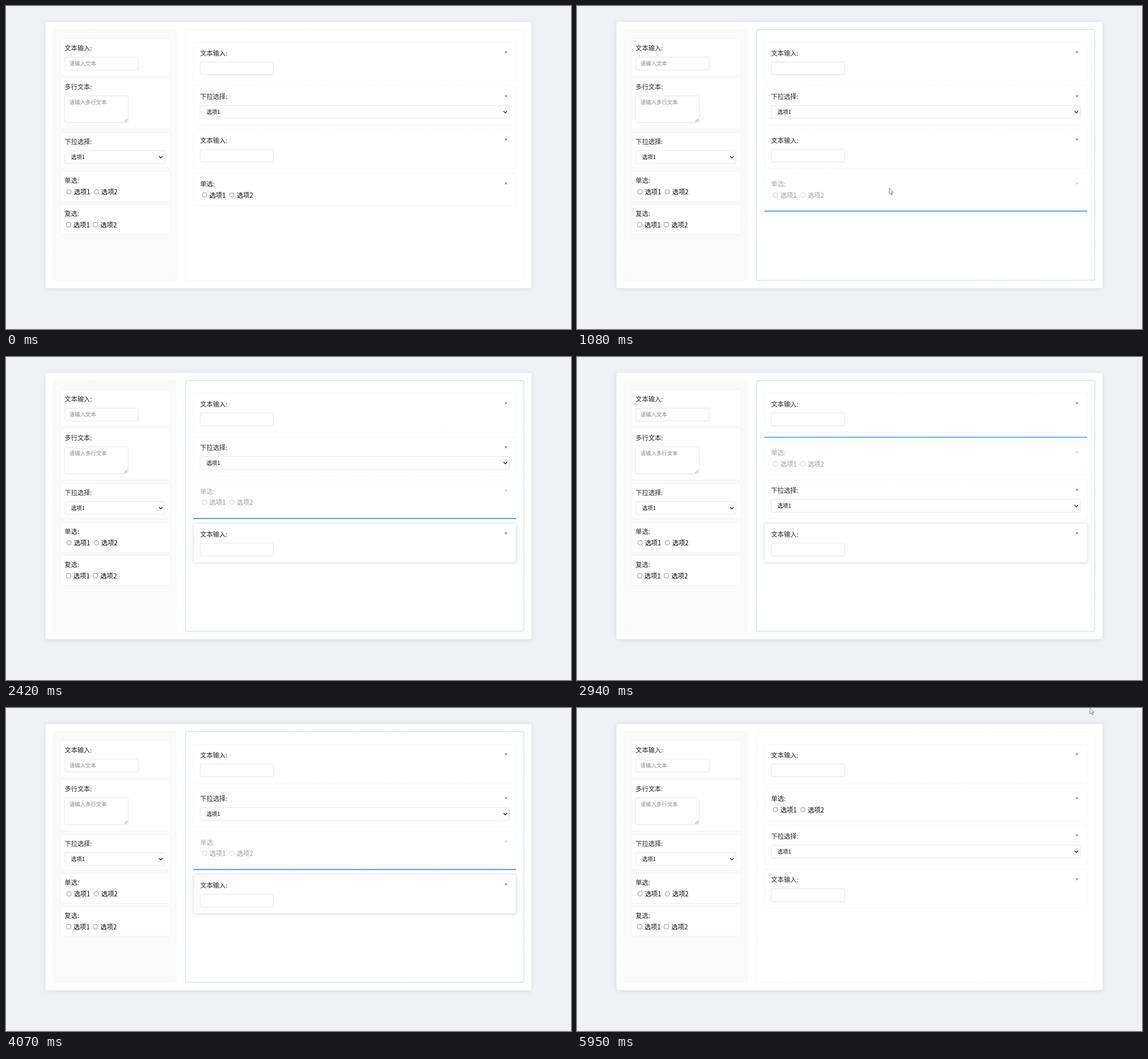
An HTML page that plays this animation: 989 by 566 pixels, repeating every 5990 ms.

```html
<!DOCTYPE html>
<html lang="zh-CN">
<head>
<meta charset="utf-8">
<style>
html, body { margin: 0; width: 100%; height: 100%; overflow: hidden; background: #eff1f6; }
svg { display: block; font-family: "Noto Sans CJK SC", "Noto Sans CJK", sans-serif; }
.panel { fill: #fff; filter: drop-shadow(0 1px 4px rgba(0,0,0,.1)); }
.tile { fill: #fff; filter: drop-shadow(0 .7px 1px rgba(0,0,0,.08)); }
.field { fill: #fff; stroke: #e6e6e8; }
.lift { fill: #fff; stroke: #e8eaee; filter: drop-shadow(0 1.5px 3px rgba(0,0,0,.13)); }
.dash { fill: none; stroke: #f0f0f0; stroke-dasharray: 2 1.4; }
.mark { fill: #fff; stroke: #767676; stroke-width: .8; }
.chevron { fill: none; stroke: #222; stroke-width: 1.4; }
</style>
</head>
<body>
<svg id="stage" width="989" height="566" viewBox="0 0 989 566"></svg>
<script>
const LOOP = 5990, TOP = 63.5, LINE_SLOT = 9.4;
const stage = document.getElementById('stage');

const rect = (cls, x, y, w, h, r = 3) =>
  `<rect class="${cls}" x="${x}" y="${y}" width="${w}" height="${h}" rx="${r}"/>`;
// y is the optical centre of the glyphs
const text = (s, x, y, size = 11.2, fill = '#222') =>
  `<text x="${x}" y="${y + size * .38}" font-size="${size}" fill="${fill}">${s}</text>`;
const hint = (s, x, y) => text(s, x, y, 9.33, '#858585');
const select = (x, y, w) => rect('field', x, y, w, 22.5) +
  text('选项1', x + 11, y + 11, 9.33, '#000') +
  `<path class="chevron" d="M${x + w - 10} ${y + 9.7}l3 3 3-3"/>`;
const radio = (x, y) => `<circle class="mark" cx="${x}" cy="${y}" r="4"/>`;
const radios = (x, y) => radio(x, y) + text('选项1', x + 8.5, y + .3, 11.2, '#000') +
  radio(x + 47.7, y) + text('选项2', x + 56.3, y + .3, 11.2, '#000');
const checkbox = (x, y) => rect('mark', x, y, 7.6, 7.6, 1.3);

const palette = rect('', 83, 41.5, 214.5, 439, 2).replace('class=""', 'fill="#fafafa"') +
  rect('dash', 83, 41.5, 214.5, 439, 2) +
  [[58, 63], [126, 89], [222, 61.5], [290, 52], [348, 51.5]]
    .map(([y, h]) => rect('tile', 95.5, y, 191, h)).join('') +
  text('文本输入:', 102.5, 74) + rect('field', 103, 89.5, 128.5, 22.5) + hint('请输入文本', 111, 100.5) +
  text('多行文本:', 102.5, 142) + rect('field', 102.5, 157.5, 111.5, 47) + hint('请输入多行文本', 111, 168.2) +
  '<path d="M207 203l5.5-5.5M210 203l2.5-2.5" stroke="#666" stroke-width=".8"/>' +
  text('下拉选择:', 102.5, 237.5) + select(103, 253.5, 175) +
  text('单选:', 102.5, 306) + radios(110.4, 325.5) +
  text('复选:', 102.5, 364) +
  checkbox(106, 379.5) + text('选项1', 118, 383.7, 11.2, '#000') +
  checkbox(152.6, 379.5) + text('选项2', 165.3, 383.7, 11.2, '#000');

const box = rect('field', 340, 34.5, 128.5, 22.5);
const kinds = {
  text1: ['文本输入:', box, 68.3, 76.5],
  select: ['下拉选择:', select(340, 34.5, 541), 68.3, 76.5],
  text2: ['文本输入:', box, 68.3, 76.5],
  radio: ['单选:', radios(347.6, 38), 57.5, 65.8]
};
const card = ([name, [label, body, h]]) => `<g id="${name}">` +
  rect('dash', 328.5, 0, 564.5, h) + rect('lift', 328.5, 0, 564.5, h) +
  text(label, 339.8, 18.8) + body +
  '<text x="875.3" y="20.6" font-size="9.5" text-anchor="middle" fill="#444" font-family="Noto Sans, sans-serif">×</text></g>';

stage.innerHTML = rect('panel', 69, 28, 851, 466.5, 4) + palette +
  rect('dash', 314.5, 41.5, 592, 439, 1) +
  '<rect id="active" x="314.5" y="41.5" width="592" height="439" rx="1" fill="none" stroke="#a6cfee" stroke-dasharray="1.6 .9"/>' +
  Object.entries(kinds).map(card).join('') +
  '<path id="line" d="M328 0H893" stroke="#45a2ee" stroke-width="1.8"/>' +
  '<path id="cursor" d="M0 0V10.2L2.4 8 4.1 11.8 5.6 11.1 4 7.5H7.2Z" fill="#fff" stroke="#666" stroke-width=".8"/>';

const el = id => document.getElementById(id);
const clamp = v => Math.max(0, Math.min(1, v));
const pulse = (t, from, to) => clamp((t - from) / 200) * (1 - clamp((t - to) / 200));
const glide = (t, from, to) => { const u = clamp((t - from) / (to - from)); return u * u * (3 - 2 * u); };

// time, place of the radio card, drop line position relative to it
const moves = [
  [0, 3, ''], [900, 3, 'after'], [1460, 2, 'before'], [1690, 1, 'before'],
  [2110, 2, 'after'], [2700, 1, 'before'], [3730, 2, 'after'], [4350, 1, 'before'], [4940, 1, '']
];

function layout(t) {
  const [, place, line] = moves.filter(m => m[0] <= t).pop();
  const order = ['text1', 'select', 'text2'];
  order.splice(place, 0, 'radio');
  let y = TOP;
  const putLine = () => { el('line').setAttribute('transform', `translate(0 ${y + .7})`); y += LINE_SLOT; };
  for (const name of order) {
    const dragged = name === 'radio';
    if (dragged && line === 'before') putLine();
    el(name).setAttribute('transform', `translate(0 ${y})`);
    y += kinds[name][3];
    if (dragged && line === 'after') putLine();
  }
  el('line').setAttribute('opacity', line ? 1 : 0);
  el('radio').setAttribute('opacity', line ? .4 : 1);
}

function pointer(t) {
  const leaving = t >= 5280;
  const u = leaving ? glide(t, 5280, 5760) : glide(t, 190, 600);
  const [x0, y0, x1, y1] = leaving ? [610, 118, 898, 0] : [650, 440, 546.5, 319];
  el('cursor').setAttribute('transform', `translate(${x0 + (x1 - x0) * u} ${y0 + (y1 - y0) * u})`);
  el('cursor').setAttribute('opacity', leaving || (t >= 190 && t < 2110) ? 1 : 0);
}

function draw(t) {
  layout(t);
  pointer(t);
  const hover = {
    text1: pulse(t, 4920, 5500),
    select: 0,
    text2: pulse(t, 1460, 4940),
    radio: pulse(t, 480, 860)
  };
  for (const name in hover) el(name).querySelector('.lift').setAttribute('opacity', hover[name]);
  el('active').setAttribute('opacity', pulse(t, 190, 5580));
}

function tick() {
  draw(performance.now() % LOOP);
  requestAnimationFrame(tick);
}
tick();
</script>
</body>
</html>
```
